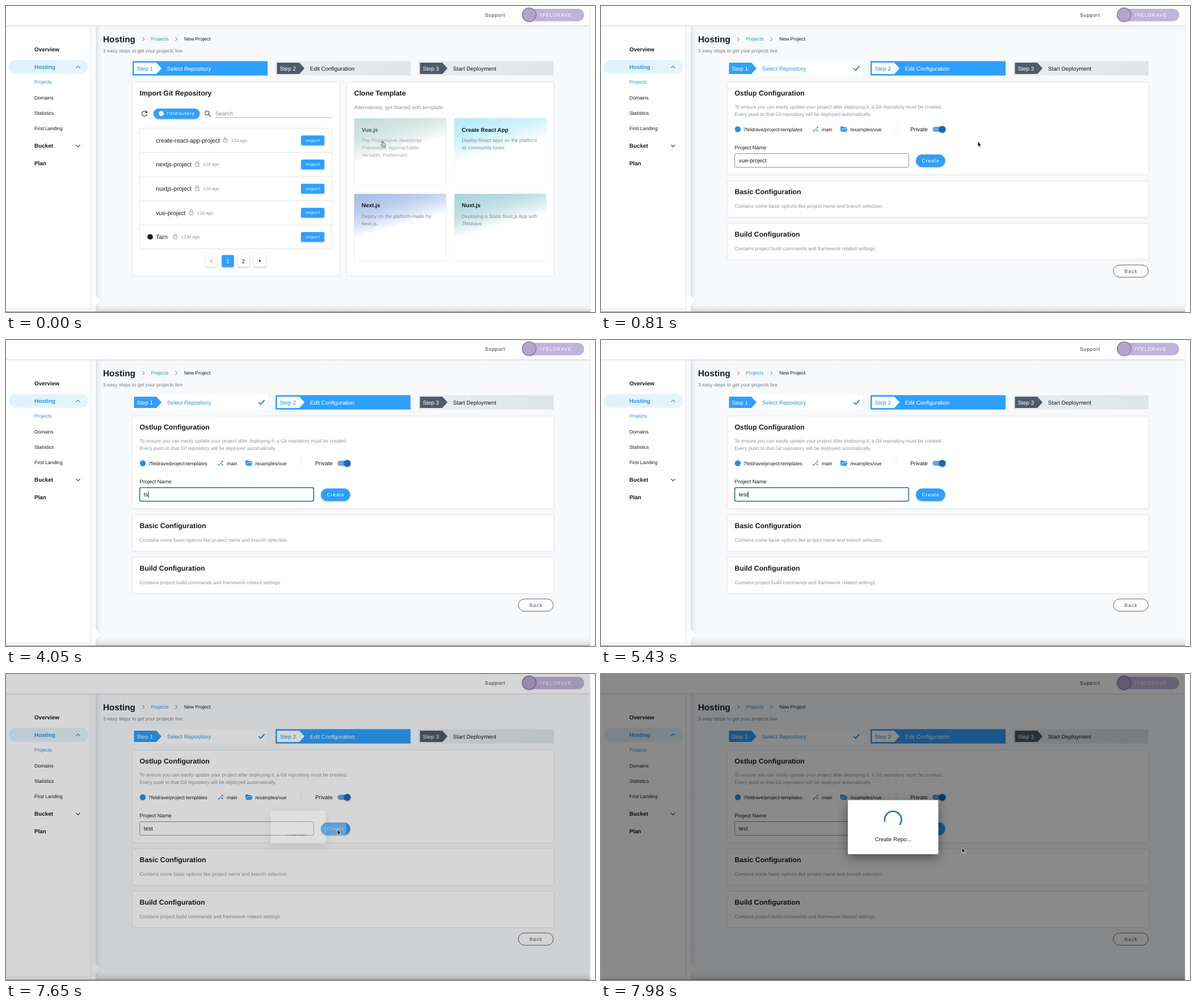
An HTML page for the animation above (8 s loop, 1038 by 540 pixels).

```html
<!DOCTYPE html>
<html lang="en">
<head>
<meta charset="utf-8">
<title>New Project</title>
<style>
html, body { margin: 0; width: 100%; height: 100%; overflow: hidden; background: #fff; }
svg { display: block; }
text { font-family: "Liberation Sans", Arial, sans-serif; text-rendering: geometricPrecision; white-space: pre; }
.card { fill: #fff; filter: drop-shadow(0 0 1.5px rgba(70, 90, 120, .25)); }
.raised { filter: drop-shadow(0 1px 1.2px rgba(0, 0, 0, .32)); }
.line { fill: none; stroke-linecap: round; stroke-linejoin: round; }
</style>
</head>
<body>
<svg id="stage" width="1038" height="540" viewBox="0 0 1038 540"></svg>
<script>
const LOOP = 8000;
const BLUE = '#2f9ffd', LINK = '#2d8fdd', INK = '#17181a', GREY = '#8d939b', SLATE = '#4f5b6a';

// Drawing helpers
const text = (x, y, s, size = 8.62, fill = INK, more = '') =>
  `<text x="${x}" y="${y}" font-size="${size}" fill="${fill}" ${more}>${s}</text>`;
const bold = (x, y, s, size = 9.9, fill = INK) => text(x, y, s, size, fill, 'font-weight="700"');
const spaced = (x, y, s, size, fill, gap) => text(x, y, s, size, fill, `letter-spacing="${gap}"`);
const rect = (x, y, w, h, fill, r = 0, more = '') =>
  `<rect x="${x}" y="${y}" width="${w}" height="${h}" rx="${r}" fill="${fill}" ${more}/>`;
const circle = (x, y, r, fill, more = '') => `<circle cx="${x}" cy="${y}" r="${r}" fill="${fill}" ${more}/>`;
const line = (d, stroke, w = 1, more = '') => `<path class="line" d="${d}" stroke="${stroke}" stroke-width="${w}" ${more}/>`;
const shape = (d, fill, more = '') => `<path d="${d}" fill="${fill}" ${more}/>`;
const group = (id, body, more = '') => `<g id="${id}" ${more}>${body}</g>`;
const card = (x, y, w, h) => rect(x, y, w, h, '#fff', 2, 'class="card"');
const gradient = (id, x2, y2, ...stops) =>
  `<linearGradient id="${id}" x1="0" y1="0" x2="${x2}" y2="${y2}">` +
  stops.map(([at, c, o = 1]) => `<stop offset="${at}" stop-color="${c}" stop-opacity="${o}"/>`).join('') +
  '</linearGradient>';

const TINTS = { vue: '#c2dcd7', react: '#b3ebfd', next: '#a3bbe9', nuxt: '#a6d2d9' };

const defs = '<defs>' +
  Object.entries(TINTS).map(([k, c]) => gradient(k, .38, 1, [0, c], [.25, c, .75], [.58, '#fff'])).join('') +
  gradient('edge', 1, 0, [0, '#dde1e6'], [.35, '#eceff3'], [1, '#f7f9fb', 0]) +
  gradient('under', 0, 1, [0, '#d9dde2'], [1, '#f7f9fb', 0]) +
  gradient('foot', 0, 1, [0, '#eceef0', 0], [1, '#d3d5d7']) +
  gradient('pill', 1, 0, [0, '#dff2fd'], [1, '#e6f5fb']) +
  gradient('idle', 1, 0, [0, '#e7edf0'], [1, '#dfe6e9']) +
  '<clipPath id="button"><rect x="555" y="262" width="51.5" height="22" rx="11"/></clipPath></defs>';

function frameParts() {
  const sub = ['Projects', 'Domains', 'Statistics', 'First Landing'];
  return rect(0, 0, 1038, 540, '#f7f9fb') +
    rect(158, 34, 14, 506, 'url(#edge)') +
    rect(0, 525, 1029, 15, 'url(#foot)') +
    rect(0, 34, 158, 506, '#fafbfc') + rect(0, 34, 149, 501, '#fff') +
    shape('M150 514L158 511L167 520L158 529L150 526Z', '#fff') +
    line('M149.5 35V535M0 535H149', '#e0e3e6') +
    rect(0, 34, 1029, 5, 'url(#under)') + rect(0, 0, 1029, 34, '#fff') +
    rect(0, 539, 1029, 1, '#8e9092') +
    spaced(844, 19, 'Support', 8.6, '#26282a', .85) +
    rect(909, 5, 110, 22, '#bfb3da', 11) +
    circle(922, 15.5, 12, '#b5a6c9', 'stroke="#9384b6" stroke-width="2"') +
    spaced(939.5, 19, '7FELDRAVE', 8.6, '#fff', .9) +
    bold(50, 79.5, 'Overview') +
    rect(5, 95, 139.5, 24.5, 'url(#pill)', 12.2) +
    bold(50, 110.5, 'Hosting', 9.9, LINK) + line('M123.8 109L127 105.8L130.2 109', LINK, 1.2) +
    sub.map((s, i) => text(50, 137.3 + i * 27.2, s, 8.6, i ? INK : LINK)).join('') +
    bold(50, 250, 'Bucket') + line('M123.8 245.4L127 248.6L130.2 245.4', '#333', 1.2) +
    bold(50, 281, 'Plan') +
    bold(171, 63.5, 'Hosting', 15.3) +
    line('M240.8 55.3L243.8 58.3L240.8 61.3M298.8 55.3L301.8 58.3L298.8 61.3', '#666') +
    text(255.5, 61.3, 'Projects', 8.6, LINK) + text(314, 61.3, 'New Project', 8.6) +
    text(171, 81.5, '3 easy steps to get your projects live', 8.66, '#767b81');
}

function step(x, n, title, state) {
  const [bar, tag, label, name] = {
    active: [BLUE, '#fff', LINK, '#fff'],
    done: ['#fff', BLUE, '#fff', LINK],
    idle: ['url(#idle)', SLATE, '#fff', INK]
  }[state];
  return rect(x, 97.3, 238, 25.4, bar) +
    shape(`M${x + 2.5} 100H${x + 42}L${x + 51} 110L${x + 42} 120H${x + 2.5}Z`, tag) +
    text(x + 7.5, 113.6, 'Step ' + n, 9.9, label) + text(x + 60.8, 113.6, title, 9.9, name) +
    (state === 'done' ? line(`M${x + 223} 110.5L${x + 226} 113.5L${x + 232} 106.5`, LINK, 2) : '');
}

const steps = (...states) => ['Select Repository', 'Edit Configuration', 'Start Deployment']
  .map((s, i) => step(223 + i * 252, i + 1, s, states[i])).join('');

const lock = (x, y) => rect(x - 3.2, y - 1.8, 6.4, 5.4, 'none', .8, 'stroke="#8a8a8a" stroke-width=".9"') +
  line(`M${x - 2} ${y - 2}V${y - 3}A2 2 0 0 1 ${x + 2} ${y - 3}V${y - 2}M${x} ${y + .5}V${y + 1.3}`, '#8a8a8a', .9);

function repoRow([name, lockX, age], i) {
  const y = 237 + i * 42.6;
  return (i ? line(`M236 ${y - 21.3}H574`, '#dfe2e5') : '') +
    text(264.3, y + 3.7, name, 10.55) + lock(lockX, y) +
    text(lockX + 10, y + 2.8, age, 8, GREY) +
    rect(520, y - 8.5, 41, 17, BLUE, 2, 'class="raised"') +
    spaced(528.3, y + 2.6, 'Import', 7.4, '#fff', .75);
}

function template(x, y, tint, title, lines, faded) {
  return rect(x, y, 161.5, 118.5, '#fff', 1, 'stroke="#dfe3e7"') +
    rect(x, y, 161.5, 118.5, `url(#${tint})`, 1) +
    bold(x + 13, y + 23.5, title, 9.9, faded ? '#505a5b' : INK) +
    lines.map((s, i) => text(x + 13, y + 42 + i * 13, s, 8.62, faded ? '#a0a8aa' : '#858c94')).join('');
}

function importPage() {
  const repos = [['create-react-app-project', 386.5, '12d ago'], ['nextjs-project', 337, '12d ago'],
    ['nuxtjs-project', 337, '12d ago'], ['vue-project', 326.5, '12d ago'], ['Tarn', 298.5, '123d ago']];
  const pager = [351, 380.3, 407.7, 437].map((x, i) =>
    rect(x, 439.5, 21.3, 21, i === 1 ? BLUE : '#fff', 2, `class="raised" ${i ? '' : 'opacity=".75"'}`)).join('');
  return steps('active', 'idle', 'idle') + card(223, 135, 364, 341) + card(601, 135, 364, 341) +
    bold(235.5, 157.6, 'Import Git Repository', 12.35) +
    line('M247.8 187.2A4.6 4.6 0 1 0 248.4 191.5', '#444', 1.2) + shape('M249 184.5V189H244.5Z', '#444') +
    rect(260, 181, 81.5, 18, BLUE, 9, 'class="raised"') + circle(273.5, 189.8, 4.6, '#fff') +
    spaced(282, 192.4, '7feldraveorg', 7.4, '#fff', .8) +
    circle(354.3, 188.7, 3.4, 'none', 'stroke="#555" stroke-width="1.3"') + line('M357 191.5L360.3 194.8', '#555', 1.5) +
    text(369, 192.8, 'Search', 9.9, '#8a8a8a') + line('M369 197H573.5', '#999', .8) +
    rect(235.5, 215.5, 338.5, 213, '#fff', 2, 'stroke="#dfe2e5"') +
    repos.map(repoRow).join('') + circle(254, 407.4, 4.9, '#1d1f21') +
    pager + shape('M363.2 447.3V452.7L360 450Z', '#aaa') + shape('M446.2 447.3V452.7L449.4 450Z', '#333') +
    text(388.2, 453.6, '1', 9.9, '#fff') + text(415.4, 453.6, '2', 9.9) +
    bold(613.5, 157.6, 'Clone Template', 12.35) +
    text(613.5, 182, 'Alternatively, get Started with template', 9.2, GREY) +
    template(613.8, 198.3, 'vue', 'Vue.js', ['The Progressive JavaScript', 'Framework. Approachable.', 'Versatile. Performant.'], true) +
    template(790.3, 198.3, 'react', 'Create React App', ['Deploy React apps on the platform', 'its community loves.']) +
    template(613.8, 331.8, 'next', 'Next.js', ['Deploy on the platform made for', 'Next.js.']) +
    template(790.3, 331.8, 'nuxt', 'Nuxt.js', ['Deploying a Static Nuxt.js App with', '7feldrave']);
}

function configPage() {
  return steps('done', 'active', 'idle') +
    card(223, 135, 742, 162) + card(223, 309.3, 742, 63) + card(223, 384, 742, 63) +
    bold(235.5, 157.6, 'Ostlup Configuration', 12.33) +
    text(235.5, 181.2, 'To ensure you can easily update your project after deploying it, a Git repository must be created.', 8.62, GREY) +
    text(235.5, 194.2, 'Every push to that Git repository will be deployed automatically.', 8.62, GREY) +
    circle(241, 217.5, 5.2, LINK) + text(251, 220.5, '7feldrave/project-templates') +
    line('M375 220.3L381.3 214.5M378 217.5L381 219.5', LINK, 1) +
    circle(375, 220.3, 1.3, LINK) + circle(381.4, 214.3, 1.3, LINK) + circle(381.4, 219.7, 1.2, LINK) +
    text(389, 220.5, 'main') +
    shape('M422 221V213.5Q422 212.5 423 212.5H426.5L427.8 214H432Q433 214 433 215V216H425L422.8 221Z', LINK) +
    shape('M425.4 216.7H434.7L432.6 222H423Z', BLUE) +
    text(439, 220.5, '/examples/vue') + line('M520 210V223', '#e3e6e9') +
    text(545, 221, 'Private', 9.9) + rect(584.3, 213, 21, 9, '#6da3da', 4.5) +
    circle(601.4, 217.6, 6.1, '#1766c0', 'class="raised"') +
    text(235.5, 252.5, 'Project Name', 9.25) +
    '<rect id="field" x="235.7" y="260.6" width="306.6" height="24" rx="2.5" fill="#fff"/>' +
    '<rect id="pick" x="242.7" y="267" width="50" height="11.5" fill="#b3d7fe"/>' +
    group('value', text(242.8, 276.2, '', 9.9)) +
    '<rect id="caret" y="267" width=".9" height="11.5" fill="#111"/>' +
    rect(555, 262, 51.5, 22, BLUE, 11, 'class="raised"') + spaced(565.4, 275.6, 'Create', 8.6, '#fff', .9) +
    '<g clip-path="url(#button)"><circle id="ripple" cx="580.7" cy="273" fill="#cfe0ee"/></g>' +
    bold(235.5, 332.3, 'Basic Configuration', 12.33) +
    text(235.5, 355.8, 'Contains some basic options like project name and branch selection.', 8.62, GREY) +
    bold(235.5, 407.2, 'Build Configuration', 12.33) +
    text(235.5, 430.7, 'Contains project build commands and framework related settings.', 8.62, GREY) +
    rect(903, 457, 61.5, 21.6, '#fdfdfd', 10.8, 'stroke="#5f6266"') + spaced(922.5, 470.9, 'Back', 8.6, '#4a4d50', .95);
}

const dialogParts = rect(435, 222.5, 159.5, 95.5, '#fff', 2,
  'style="filter:drop-shadow(0 6px 9px rgba(0,0,0,.42))"') +
  '<circle id="spin" cx="514.7" cy="257" r="14.8" fill="none" stroke="#1f70b8" stroke-width="2.5" pathLength="125.66"/>' +
  text(482.7, 295.4, 'Create Repo...', 9.9);

const cursors =
  group('arrow', shape('M0 0V9.3L2.1 7.4L3.6 10.7L5.1 10L3.7 6.8H6.6Z', '#111', 'stroke="#fff" stroke-width=".8"')) +
  group('hand', shape('M-.9 .8Q-.9 0 0 0Q.9 0 .9 .8V3.4Q1.8 2.9 2.4 3.7Q3.3 3.3 3.8 4.2Q5 3.9 5 5.2V7.4Q4.8 9 4 10.2H-.6Q-1.5 8.6-3.2 6.6Q-3.6 5.5-2.4 5.4L-.9 6.4Z',
    '#fff', 'stroke="#222" stroke-width=".8"') + line('M.9 6.3V8.5M2.5 6.3V8.5', '#222', .6)) +
  group('beam', line('M-1.8-4.8Q0-4.8 0-3.4Q0-4.8 1.8-4.8M0-3.8V3.8M-1.8 4.8Q0 4.8 0 3.4Q0 4.8 1.8 4.8M-1 1.6H1', '#222', .9));

const stage = document.getElementById('stage');
stage.innerHTML = defs + frameParts() + group('first', importPage()) + group('second', configPage()) +
  rect(0, 0, 1029, 540, '#000', 0, 'id="shade"') +
  rect(1029, 0, 9, 540, '#fdfdfd') + line('M1029.5 0V540', '#e8e8e8') +
  group('dialog', dialogParts) + group('cursor', cursors);

const el = {};
stage.querySelectorAll('[id]').forEach(n => el[n.id] = n);
const label = el.value.firstChild;
const set = (n, attrs) => { for (const k in attrs) n.setAttribute(k, attrs[k]); };
const show = (n, on) => n.setAttribute('visibility', on ? 'inherit' : 'hidden');

// Timing helpers
const span = (t, a, b) => Math.min(1, Math.max(0, (t - a) / (b - a)));
const smooth = p => p * p * (3 - 2 * p);
const mix = (a, b, p) => a + (b - a) * p;
const last = (list, t) => list.filter(e => e[0] <= t).pop();

const SWAP = 300, FOCUS = 2430, SELECT = 2640, CLEAR = 2880, BLUR = 7500, OPEN = 7635;
const BLINK = 330;

// [time, value, caret x]
const TYPING = [[0, 'vue-project', 292.7], [CLEAR, '', 242.8], [3210, 't', 245.9], [3330, 'ts', 250.6],
  [4920, 't', 245.9], [5010, 'te', 251.2], [5100, 'tes', 256.1], [5220, 'test', 258.8]];

// [start, end, x, y]
const MOVES = [[1620, 2250, 462.5, 272.7], [7050, 7440, 584, 274.5], [7690, 7950, 636, 306.5]];

function pointer(t) {
  let x = 664, y = 239;
  for (const [a, b, nx, ny] of MOVES) {
    const p = smooth(span(t, a, b));
    x = mix(x, nx, p);
    y = mix(y, ny, p);
  }
  return [x, y];
}

function drawField(t, hover) {
  const focus = t >= FOCUS && t < BLUR;
  const [at, value, x] = last(TYPING, t);
  const since = t - Math.max(at, FOCUS);
  const picked = t >= SELECT && t < CLEAR;
  label.textContent = value;
  show(el.pick, picked);
  show(el.caret, focus && !picked && Math.floor(since / BLINK) % 2 === 0);
  set(el.caret, { x });
  set(el.field, {
    stroke: focus ? '#1c63a8' : hover ? '#26282a' : '#8c8f92',
    'stroke-width': focus ? 1.5 : 1
  });
}

function drawDialog(t) {
  const p = 1 - Math.pow(1 - span(t, OPEN, OPEN + 195), 3);
  show(el.dialog, t >= OPEN);
  set(el.dialog, {
    opacity: p,
    transform: `translate(514.7 270.2) scale(${.5 + p / 2}) translate(-514.7 -270.2)`
  });
  const turn = Math.max(0, t - 7645) / 930 % 1;
  const e = smooth(turn * 2 % 1), grow = turn < .5;
  set(el.spin, {
    'stroke-dasharray': `${grow ? 1 + 99 * e : 100} 200`,
    'stroke-dashoffset': grow ? -15 * e : -15 - 109 * e,
    transform: `rotate(${turn * 360} 514.7 257)`
  });
}

function draw(t) {
  const [x, y] = pointer(t);
  const overField = t > SWAP && x > 236 && x < 542 && y > 261 && y < 285;
  const overButton = x > 556 && x < 606 && y > 262 && y < 285;
  const hand = t < SWAP || (overButton && t < 7590);
  show(el.first, t < SWAP);
  show(el.second, t >= SWAP);
  drawField(t, overField);
  set(el.ripple, { r: 30 * smooth(span(t, 7500, 7750)), opacity: .45 * (1 - span(t, 7700, 7880)) });
  set(el.shade, { opacity: .46 * smooth(span(t, 7565, 7780)) });
  drawDialog(t);
  set(el.cursor, { transform: `translate(${x} ${y})` });
  show(el.cursor, t < CLEAR || t >= 7050);
  show(el.hand, hand);
  show(el.beam, overField && !hand);
  show(el.arrow, !overField && !hand);
}

const begin = performance.now();
function tick() {
  draw((performance.now() - begin) % LOOP);
  requestAnimationFrame(tick);
}
tick();
</script>
</body>
</html>
```
